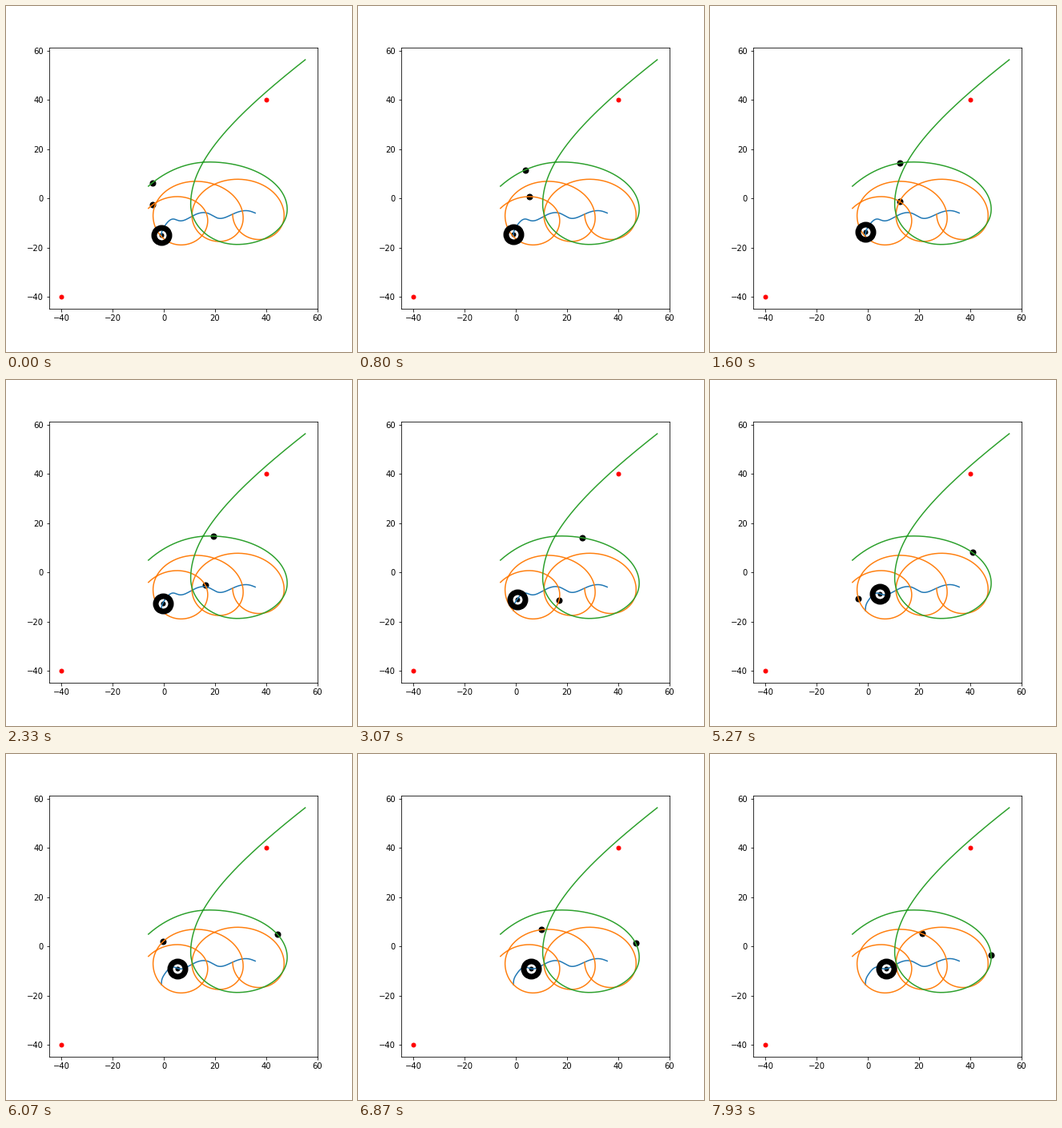
These frames come from a looping animation (432 px wide and 432 px high, 8000 ms). A matplotlib script:

```python
import numpy as np
import matplotlib.pyplot as plt
from matplotlib.animation import FuncAnimation

FRAMES = 120
DURATION = 8000

# Extremes of each loop in turn: left, top, right, bottom, left, ...
ORANGE = [(-10.8, -15.9), (5.2, 0.74), (17.15, -9), (6.7, -18.9),
          (-4.2, -7), (12.5, 6.95), (31, -8), (21.7, -17.5),
          (11, -7), (28.8, 7.8), (47, -7), (37.2, -16.7), (26.9, -6.4)]
GREEN = [(-22.2, -35.2), (17.8, 14.8), (48.2, -4.4), (28.6, -18.7),
         (10.5, -2.4)]

# Drift of the heavy body
BLUE = [(-0.93, -15.53), (-0.8, -13.68), (0.48, -10.98), (3.77, -8.37),
        (5.8, -9.02), (11.3, -7.07), (17, -5.95), (21.3, -8.05),
        (27.5, -6.1), (33.4, -5.1), (35.71, -5.93)]

# Keyframes: progress of the bodies along their orbits
KEY_TIMES = [0, 24, 46, 66, 79, 103, 119]
BLUE_KEYS = [0.58, 1.85, 4.84, 7.9, 10.06, 11.17, 12.78]
ORANGE_KEYS = [0.59, 1.41, 2.15, 3.0, 3.81, 4.905, 5.34]


def spline(t, values, at):
    """Natural cubic spline through (t, values), evaluated at `at`."""
    t, v, at = (np.asarray(a, float) for a in (t, values, at))
    h = np.diff(t)
    n = len(t)
    A = np.eye(n)
    b = np.zeros(n)
    slope = np.diff(v) / h
    for i in range(1, n - 1):
        A[i, i - 1:i + 2] = h[i - 1], 2 * (h[i - 1] + h[i]), h[i]
        b[i] = 6 * (slope[i] - slope[i - 1])
    m = np.linalg.solve(A, b)
    k = np.clip(np.searchsorted(t, at, side="right") - 1, 0, n - 2)
    p, q, w = t[k + 1] - at, at - t[k], h[k]
    return ((m[k] * p**3 + m[k + 1] * q**3) / (6 * w)
            + (v[k] / w - m[k] * w / 6) * p
            + (v[k + 1] / w - m[k + 1] * w / 6) * q)


def arcs(extremes, u):
    """Chain of quarter ellipses; u counts quarter turns."""
    pts = np.array(extremes, float)
    k = np.clip(np.floor(u).astype(int), 0, len(pts) - 2)
    (x0, y0), (x1, y1) = pts[k].T, pts[k + 1].T
    c, s = np.cos((u - k) * np.pi / 2), np.sin((u - k) * np.pi / 2)
    from_side = k % 2 == 0
    x = np.where(from_side, x1 + (x0 - x1) * c, x0 + (x1 - x0) * s)
    y = np.where(from_side, y0 + (y1 - y0) * s, y1 + (y0 - y1) * c)
    return np.array([x, y])


def drift(s):
    """Position after distance s along the heavy body's track."""
    pts = np.array(BLUE)
    chord = np.hypot(*np.diff(pts, axis=0).T)
    knots = np.concatenate([[0], np.cumsum(chord)])
    if s is None:
        s = np.linspace(0, knots[-1], 300)
    return np.array([spline(knots, pts[:, 0], s), spline(knots, pts[:, 1], s)])


def escape(start):
    """Hyperbolic fly-off from the last extreme."""
    a = np.linspace(0, 1.082, 150)
    return np.array([start[0] + 69.4 * (np.cosh(a) - 1),
                     start[1] + 45 * np.sinh(a)])


t = np.arange(FRAMES)
blue_body = drift(spline(KEY_TIMES, BLUE_KEYS, t))
orange_body = arcs(ORANGE, spline(KEY_TIMES, ORANGE_KEYS, t))
green_body = arcs(GREEN, 0.626 + 0.0122 * t - 6.8e-6 * t**2)

green_orbit = np.hstack([arcs(GREEN, np.linspace(0.594, 4, 400)),
                         escape(GREEN[-1])])
orange_orbit = arcs(ORANGE, np.linspace(0.506, 12, 900))

fig = plt.figure(figsize=(6, 6), dpi=72, facecolor="white")
ax = fig.add_axes([0.125, 0.125, 0.775, 0.755])
ax.set_xlim(-44.76, 60)
ax.set_ylim(-44.83, 61.33)

ax.plot([-40, 40], [-40, 40], "r.", ms=10)
for orbit, color in ((drift(None), "C0"), (orange_orbit, "C1"),
                     (green_orbit, "C2")):
    ax.plot(*orbit, color=color, lw=1.5)


def marker(size, **style):
    return ax.plot([], [], "ko", ms=size, **style)[0]


bodies = [(marker(5, zorder=1.9), blue_body),
          (marker(7, zorder=1.9), orange_body),
          (marker(7, zorder=1.9), green_body),
          (marker(19, mew=7, mfc="none", zorder=3), blue_body)]


def update(i):
    for artist, body in bodies:
        artist.set_data([body[0, i]], [body[1, i]])
    return [artist for artist, _ in bodies]


anim = FuncAnimation(fig, update, frames=FRAMES, interval=DURATION / FRAMES,
                     repeat=True, repeat_delay=0)
plt.show()
```
